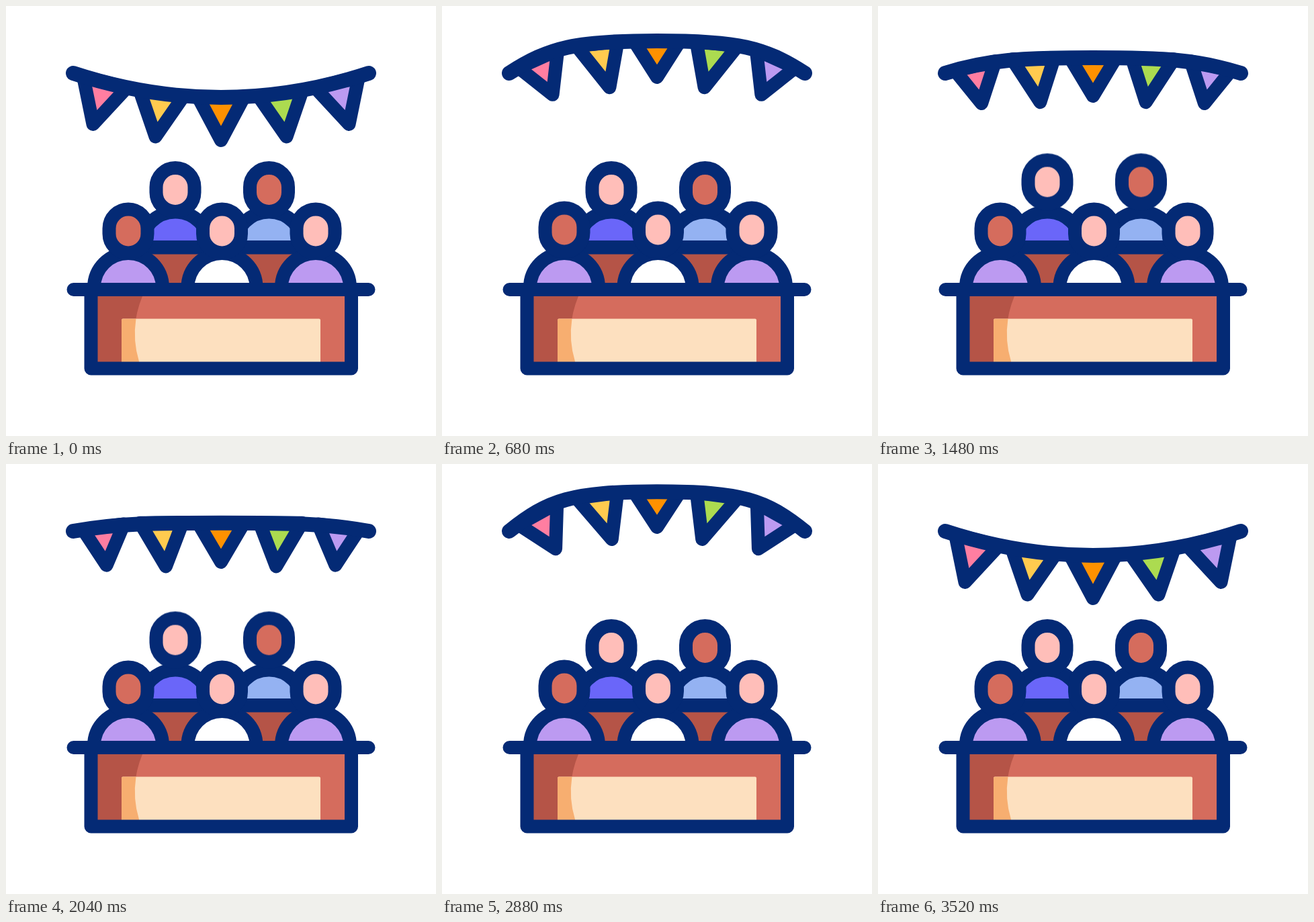
An HTML page without scripts for the animation above (3600 ms loop, 640 by 640 pixels).

```html
<!DOCTYPE html>
<html lang="en">
<head>
<meta charset="utf-8">
<title>Party crowd</title>
<style>
  html, body { margin: 0; width: 100%; height: 100%; overflow: hidden; background: #fff; }
  svg { display: block; width: 100vw; height: 100vh; }

  .line { stroke: #042a75; stroke-width: 20; stroke-linecap: round; stroke-linejoin: round; }
  .navy { fill: #042a75; }

  /* Bunting: every path morphs between its hanging and its lifted shape */
  .sway { d: var(--down); animation: sway 3.6s cubic-bezier(.37, 0, .63, 1) infinite; }
  .rope {
    fill: none; stroke-width: 22;
    --down: path("M100 100 C173 124 247 136 320 136 C393 136 467 124 540 100");
    --up: path("M100 100 C158 51.6 192 39 320 39 C448 39 482 51.6 540 100");
  }
  .outer {
    --down: path("M115 105 L180 121.5 L129.5 176 Z");
    --up: path("M114 90 L171 57 L170 125 Z");
  }
  .inner {
    --down: path("M199 126 L264.5 134 L222.5 194.5 Z");
    --up: path("M200 49 L261 40.5 L253.5 110 Z");
  }
  .middle {
    --down: path("M286 136 L354 136 L320 200 Z");
    --up: path("M285.5 39 L354.5 39 L320 91.4 Z");
  }
  @keyframes sway {
    0%, 31.67%, 65%, 97.78%, 100% { d: var(--down); }
    14.9%, 48.33%, 81.67% { d: var(--up); }
  }

  /* Heads: the front row hops first and last, the back row in between */
  .front, .back { animation: 3.6s cubic-bezier(.37, 0, .63, 1) infinite; }
  .front { animation-name: front; }
  .back { animation-name: back; }
  @keyframes front {
    0%, 16.67%, 33.33%, 65%, 81.67%, 97.78%, 100% { transform: none; }
    8.33%, 25%, 73.33%, 89.72% { transform: translateY(-11.6px); }
  }
  @keyframes back {
    0%, 33.33%, 49.17%, 65%, 100% { transform: none; }
    41.25%, 57.08% { transform: translateY(-11.6px); }
  }
</style>
</head>
<body>
<svg viewBox="0 0 640 640">
  <defs>
    <rect id="head" class="line" x="-28.5" y="10" width="57" height="65" rx="28.5"/>
    <circle id="body" class="line" cy="126.5" r="51"/>
    <clipPath id="above-bar"><rect width="640" height="360"/></clipPath>
    <clipPath id="above-counter"><rect width="640" height="422"/></clipPath>
  </defs>

  <!-- Bunting -->
  <path class="line sway outer" fill="#ff7ea1"/>
  <path class="line sway inner" fill="#ffcb4f"/>
  <path class="line sway middle" fill="#ff9100"/>
  <g transform="translate(640) scale(-1 1)">
    <path class="line sway inner" fill="#acdb50"/>
    <path class="line sway outer" fill="#bc9af1"/>
  </g>
  <path class="line sway rope"/>

  <!-- Back row -->
  <g clip-path="url(#above-bar)">
    <use href="#body" x="252" y="231" fill="#6a66f9"/>
    <use href="#body" x="391.5" y="231" fill="#94b2f2"/>
  </g>
  <g class="back">
    <use href="#head" x="252" y="231" fill="#ffbeb9"/>
    <use href="#head" x="391.5" y="231" fill="#d56c5d"/>
  </g>
  <rect x="182" y="360" width="279" height="60" fill="#b55447"/>
  <rect class="navy" x="200" y="349" width="242" height="20.5"/>

  <!-- Front row -->
  <g clip-path="url(#above-counter)">
    <use href="#body" x="182" y="292.5" fill="#bc9af1"/>
    <use href="#body" x="321.5" y="292.5" fill="#fff"/>
    <use href="#body" x="461" y="292.5" fill="#bc9af1"/>
  </g>
  <g class="front">
    <use href="#head" x="182" y="292.5" fill="#d56c5d"/>
    <use href="#head" x="321.5" y="292.5" fill="#ffbeb9"/>
    <use href="#head" x="461" y="292.5" fill="#ffbeb9"/>
  </g>

  <!-- Counter -->
  <rect x="126" y="422" width="388" height="118" fill="#d56c5d"/>
  <path d="M126 432 H203 Q183 480 198 529 V540 H126 Z" fill="#b55447"/>
  <rect x="172" y="465.5" width="296" height="74" rx="2" fill="#fde0bf"/>
  <path d="M174 465.5 H193.5 Q188.5 498 198 529 V540 H172 V467.5 Q172 465.5 174 465.5 Z" fill="#f7ae70"/>
  <path class="line" d="M126.5 422 V539.5 H514 V422 M100.5 422 H539.5" fill="none"/>
</svg>
</body>
</html>
```
